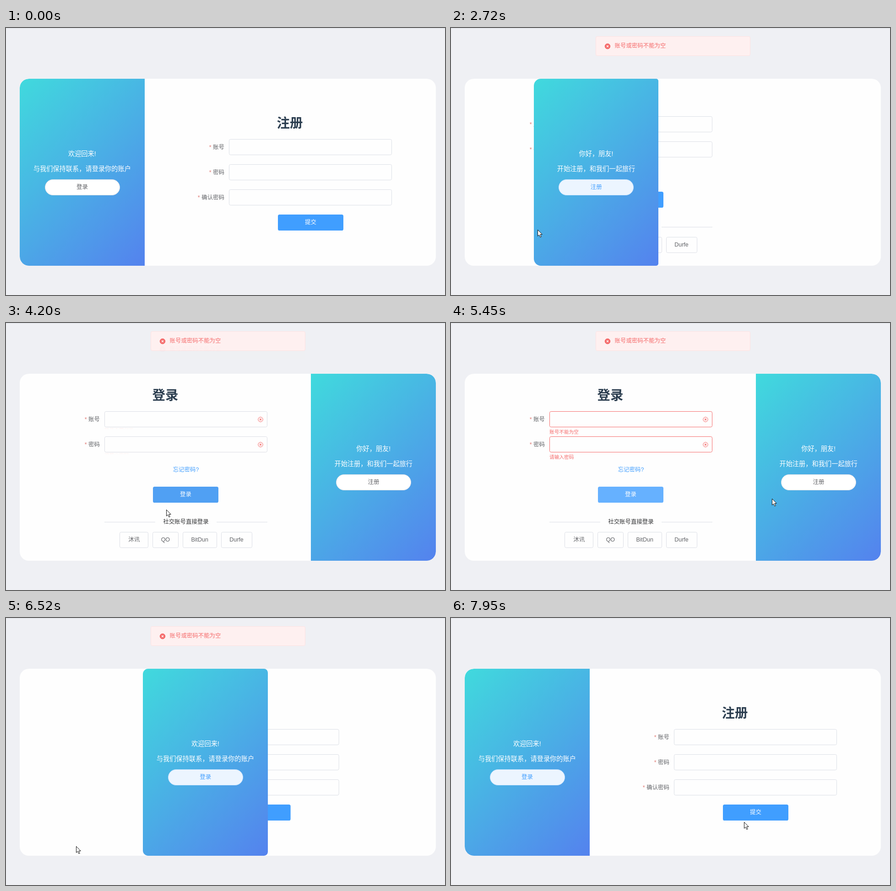
An HTML page that plays this animation: 959 px wide and 584 px high, repeating every 8000 ms.

```html
<!DOCTYPE html>
<html lang="zh-CN">
<head>
<meta charset="utf-8">
<title>注册 / 登录</title>
<style>
html, body { margin: 0; width: 100%; height: 100%; overflow: hidden; background: #eff0f4; }
body { font: 12.44px/1.2 "Liberation Sans", "Noto Sans CJK SC", "Noto Sans CJK", sans-serif; color: #606266; }
div, svg { position: absolute; box-sizing: border-box; }
div { white-space: nowrap; }
svg { overflow: visible; }
.mid, .label { display: flex; align-items: center; justify-content: center; }
.label { justify-content: flex-end; }
.label::before { content: "*"; color: #e07a74; margin-right: 3.6px; }
.rule { background: #dcdfe6; }
.card { background: #fefefe; border-radius: 20px; overflow: hidden; }
.panel { background: linear-gradient(135deg, #40dadd, #5482ee); color: #fff; }
.big { font-size: 14.22px; }
.title { font-size: 28.44px; font-weight: bold; color: #2c3e50; }
.input, .pill, .social span { border: 1px solid #dcdfe6; border-radius: 3.6px; }
.pill { border-radius: 18px; }
.solid { border-radius: 3.6px; color: #fff; font-weight: 500; }
.link { color: #409eff; }
.dark { color: #303133; }
.social { gap: 8.9px; }
.social span { box-sizing: border-box; height: 100%; padding: 0 17.8px; display: flex; align-items: center; }
.error { font-size: 10.67px; line-height: 1; padding-top: 3.6px; color: #f56c6c; transform-origin: top; }
.message { background: #fef0f0; border: 1px solid #fde2e2; border-radius: 3.6px; color: #f56c6c;
  display: flex; align-items: center; padding-left: 40.5px; }
</style>
</head>
<body>
<script>
const LOOP = 8000, PANEL_LEFT = 30, PANEL_WIDTH = 272.7, PANEL_TRAVEL = 636.4;
const TO_LOGIN = 2547, TO_REGISTER = 6187;      // panel swaps
const REGISTER_FAIL = 1370, LOGIN_FAIL = 4190;  // rejected submits
const MESSAGE_LIFE = 3000;

// Key points of the pointer: time, x, y
const PATH = [[200, 674, 578], [970, 640, 446], [1250, 655, 428], [1400, 655, 428], [1750, 502, 486],
  [2350, 170, 350], [2620, 170, 350], [2800, 203, 512], [2940, 386, 538], [3080, 496, 518], [3860, 400, 384],
  [4140, 400, 384], [4200, 350, 408], [5100, 240, 466], [5450, 700, 384], [5600, 785, 350],
  [6250, 785, 350], [6520, 153, 499], [7670, 590, 464], [7950, 658, 453]];

const clamp = v => Math.min(1, Math.max(0, v));
const ramp = (t, start, length = 100) => clamp((t - start) / length);
const mix = (a, b, p) => `color-mix(in srgb, ${b} ${clamp(p) * 100}%, ${a})`;

function bezier(x1, y1, x2, y2) {
  const at = (a, b, s) => 3 * a * s * (1 - s) ** 2 + 3 * b * s * s * (1 - s) + s ** 3;
  return x => {
    let lo = 0, hi = 1;
    for (let i = 0; i < 24; i++) {
      const s = (lo + hi) / 2;
      if (at(x1, x2, s) < x) lo = s; else hi = s;
    }
    return x <= 0 ? 0 : x >= 1 ? 1 : at(y1, y2, lo);
  };
}
const ease = bezier(.25, .1, .25, 1);
const easeZoom = bezier(.23, 1, .32, 1);
const easeBorder = bezier(.645, .045, .355, 1);

function add(parent, cls, x, y, w, h, html = '') {
  const el = document.createElement('div');
  el.className = cls;
  el.style.cssText = `left:${x}px;top:${y}px;width:${w}px;height:${h}px`;
  el.innerHTML = html;
  parent.append(el);
  return el;
}

const crossIcon = (x, y, r, disc, line) => `<svg width="1" height="1" style="left:${x}px;top:${y}px" fill="none">
  <circle r="${r}" fill="${disc}" stroke="#f56c6c"/><path d="M-2-2 2 2M2-2-2 2" stroke="${line}" stroke-width="1.1"/></svg>`;

const body = document.body;
add(body, 'rule', 0, 0, 959, 1);
const card = add(body, 'card', 30, 111, 909, 409);
const layer = () => add(card, '', -30, -111, 959, 584);

// A titled form whose rows are [label, error]
function addForm(x, top, title, rows) {
  const form = layer();
  add(form, 'mid title', x + 33, top - 55, 200, 40, title);
  const fields = rows.map(([label, error], i) => {
    const y = top + 55 * i;
    add(form, 'label', x - 110, y + 1, 100, 35, label);
    return {
      input: add(form, 'input', x, y, 356, 35),
      icon: add(form, '', x + 341, y + 17.5, 0, 0, crossIcon(0, 0, 5.2, 'none', '#f56c6c')),
      error: add(form, 'error', x, y + 35.5, 200, 15, error),
    };
  });
  return { form, fields };
}

const account = ['账号', '账号不能为空'], password = ['密码', '请输入密码'];
const register = addForm(487, 243, '注册', [account, password, ['确认密码', '请再次输入密码']]);
const submit = add(register.form, 'mid solid', 594, 408, 143, 35, '提交');

const login = addForm(215, 193, '登录', [account, password]);
add(login.form, 'mid link', 343, 311, 100, 20, '忘记密码?');
const signIn = add(login.form, 'mid solid', 321, 358, 143, 35, '登录');
for (const x of [215, 460]) add(login.form, 'rule', x, 435, 111, 1);
add(login.form, 'mid dark', 333, 425, 120, 20, '社交账号直接登录');
add(login.form, 'mid social', 215, 457, 356, 35,
  ['沐讯', 'QO', 'BitDun', 'Durfe'].map(name => `<span>${name}</span>`).join(''));

const panel = add(layer(), 'panel', 0, 111, PANEL_WIDTH, 409);
const greeting = add(panel, 'mid big', 0, 154.5, PANEL_WIDTH, 20);
const invitation = add(panel, 'mid big', 0, 187.5, PANEL_WIDTH, 20);
const swap = add(panel, 'mid pill', 54.5, 220, 164, 35);

const messages = [REGISTER_FAIL, LOGIN_FAIL].map(start => ({
  start,
  el: add(body, 'message', 316, 0, 338, 43, crossIcon(25, 21, 5.8, '#f56c6c', '#fff') + '账号或密码不能为空'),
}));

const pointer = add(body, '', 0, 0, 0, 0, `<svg width="1" height="1" style="left:0;top:0" fill="#fff" stroke="#111" stroke-linejoin="round">
  <path d="M.5.5V14.2L3.6 11.4 6 16.6 8.2 15.6 5.9 10.5H10.2Z"/>
  <path d="M-1.5 1Q0-1 1.5 1V7Q3 5.5 4.3 7.3 6 6 7 8 9 7 9.5 9.5V13Q9 16 7.5 19H-1.5L-6 12Q-5.5 9-3 10.5L-1.5 12Z"/></svg>`);
const [arrow, hand] = pointer.querySelectorAll('path');

function drawFields(fields, t, start) {
  const shown = easeZoom(ramp(t, start, 300));
  for (const { input, icon, error } of fields) {
    input.style.borderColor = mix('#dcdfe6', '#f56c6c', easeBorder(ramp(t, start, 200)));
    icon.hidden = t < start;
    error.style.opacity = shown;
    error.style.transform = `scaleY(${shown})`;
  }
}

function drawSolid(button, t, hover, press, release) {
  const rest = mix('#409eff', '#66b1ff', ramp(t, hover));
  button.style.background = mix(rest, '#3a8ee6', ramp(t, press) - ramp(t, release));
}

function drawMessage({ el, start }, t) {
  const end = start + MESSAGE_LIFE, firstEnd = REGISTER_FAIL + MESSAGE_LIFE;
  const below = start === LOGIN_FAIL ? 60 * (1 - ease(ramp(t, firstEnd, 400))) : 0;
  const slide = ease(ramp(t, start, 400)) - ease(ramp(t, end, 400));
  el.style.opacity = ease(ramp(t, start, 300)) - ease(ramp(t, end, 300));
  el.style.transform = `translateY(${18 + below - 43 * (1 - slide)}px)`;
}

function drawPointer(t) {
  pointer.hidden = t < PATH[0][0];
  const i = Math.max(1, PATH.findIndex(([time]) => time >= t));
  const [t0, x0, y0] = PATH[i - 1], [t1, x1, y1] = PATH.at(i);
  const p = ramp(t, t0, t1 - t0);
  const x = Math.round(x0 + (x1 - x0) * p), y = Math.round(y0 + (y1 - y0) * p);
  pointer.style.transform = `translate(${x}px, ${y}px)`;
  const overButton = [submit, signIn, swap].some(button => {
    const box = button.getBoundingClientRect();
    return x >= box.left && x < box.right && y >= box.top && y < box.bottom;
  });
  arrow.style.display = overButton ? 'none' : '';
  hand.style.display = overButton ? '' : 'none';
}

function draw(t) {
  const returning = t >= TO_REGISTER, atLogin = t >= TO_LOGIN && !returning;
  const back = ease(ramp(t, TO_REGISTER, 1000));
  const side = ease(ramp(t, TO_LOGIN, 1000)) - back;

  panel.style.left = PANEL_LEFT + PANEL_TRAVEL * side + 'px';
  const l = 20 * (1 - side), r = 20 * side;
  panel.style.borderRadius = `${l}px ${r}px ${r}px ${l}px`;
  greeting.textContent = atLogin ? '你好，朋友!' : '欢迎回来!';
  invitation.textContent = atLogin ? '开始注册，和我们一起旅行' : '与我们保持联系，请登录你的账户';
  swap.textContent = atLogin ? '注册' : '登录';
  const hot = ramp(t, 2300) - ramp(t, 4050) + ramp(t, 5560);
  swap.style.background = mix('#fff', '#ecf5ff', hot);
  swap.style.color = mix('#606266', '#409eff', hot);
  swap.style.borderColor = mix('#dcdfe6', '#c6e2ff', hot);

  login.form.hidden = !atLogin;
  register.form.hidden = atLogin;
  register.form.style.transform = `translateX(${returning ? PANEL_WIDTH * (back - 1) : 0}px)`;
  const registerTime = returning ? 0 : t;  // the form comes back fresh
  drawFields(register.fields, registerTime, REGISTER_FAIL);
  drawFields(login.fields, t, LOGIN_FAIL);
  drawSolid(submit, registerTime, 1040, 1280, 1370);
  drawSolid(signIn, t, 3860, 4050, 4150);
  messages.forEach(m => drawMessage(m, t));
  drawPointer(t);
}

function tick() {
  draw(performance.now() % LOOP);
  requestAnimationFrame(tick);
}
tick();
</script>
</body>
</html>
```
